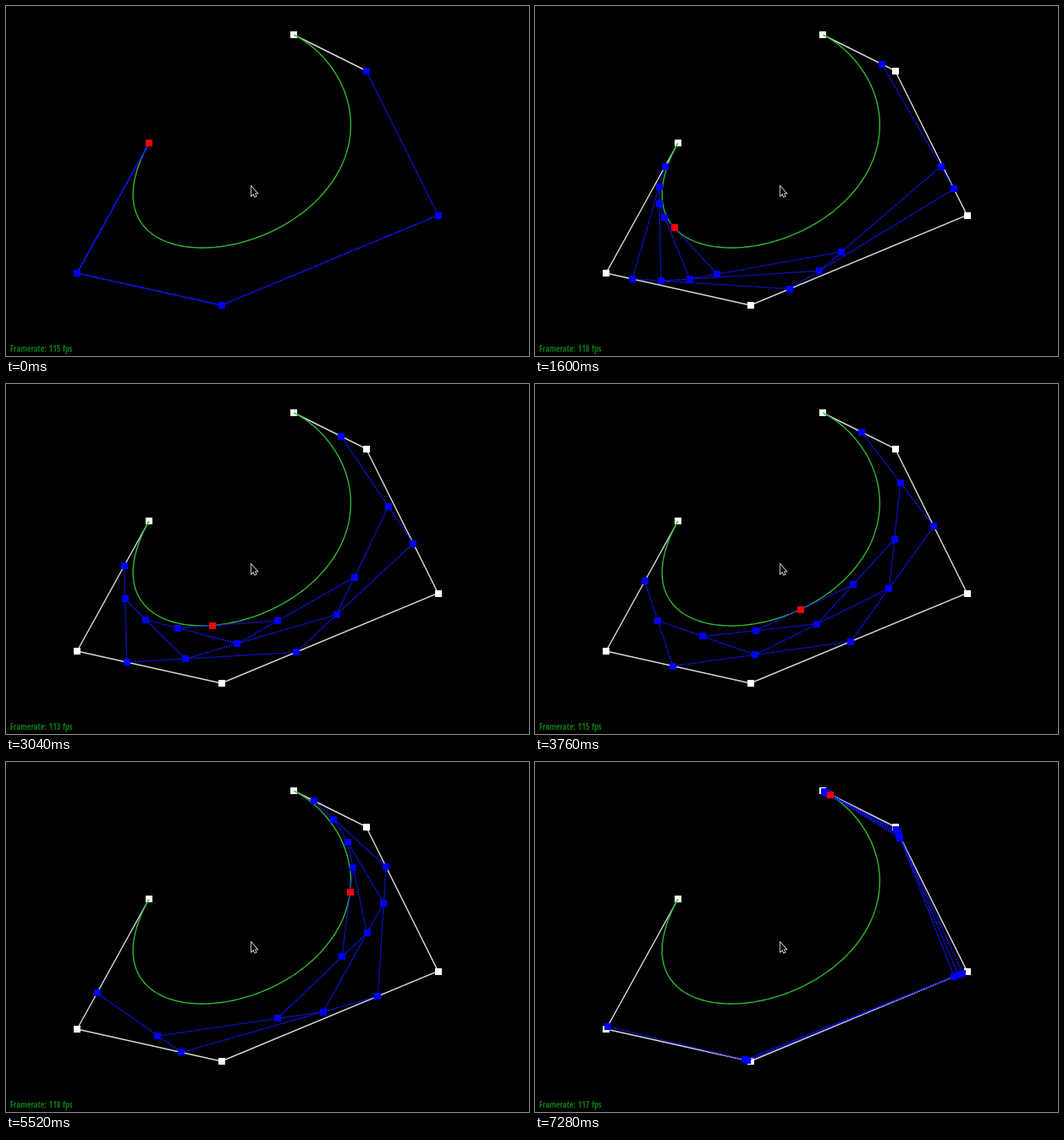
Write an HTML page with a canvas that moves like this. It is 618 px wide and 414 px high and loops after 7.36 s.

```html
<!DOCTYPE html>
<html lang="en">
<head>
<meta charset="utf-8">
<title>Bezier curve construction</title>
<style>
  html, body { margin: 0; width: 100%; height: 100%; overflow: hidden; background: #000; }
  canvas { display: block; }
</style>
</head>
<body>
<canvas id="stage" width="618" height="414"></canvas>
<script>
const ctx = document.getElementById('stage').getContext('2d');
const STEP = 80, STEPS = 92;

const controls = [[169, 162], [84, 316], [254.5, 354], [510.5, 247.5], [425.5, 76.5], [340, 34]];
// [step, curve parameter]: the pace picks up in the middle of the curve
const pace = [[0, 0], [38, 0.345], [56, 0.581], [78, 0.82], [91, 0.98]];
const cursor = new Path2D('M290 213.5v10.8l2.4-2.2 1.6 3.6 1.6-.8-1.6-3.4h3z');

const lerp = (a, b, t) => a + (b - a) * t;

function parameterAt(step) {
  const i = pace.findIndex(([end], k) => k > 0 && step <= end);
  const [s0, t0] = pace[i - 1], [s1, t1] = pace[i];
  return lerp(t0, t1, (step - s0) / (s1 - s0));
}

// The frame rate readout wanders between 113 and 118
const frameRate = second => 113 + Math.floor((2.42 + 1.52 * second) % 6);

// One round of de Casteljau's algorithm
const reduce = (points, t) => points.slice(1).map((p, i) =>
  [lerp(points[i][0], p[0], t), lerp(points[i][1], p[1], t)]);

function pointOnCurve(t) {
  let points = controls;
  while (points.length > 1) points = reduce(points, t);
  return points[0];
}

const curve = Array.from({ length: 201 }, (_, i) => pointOnCurve(i / 200));

function polyline(points, color, width, dash = []) {
  ctx.beginPath();
  points.forEach(([x, y]) => ctx.lineTo(x, y));
  ctx.strokeStyle = color;
  ctx.lineWidth = width;
  ctx.setLineDash(dash);
  ctx.stroke();
}

function handles(points, color) {
  ctx.fillStyle = color;
  points.forEach(([x, y]) => ctx.fillRect(Math.round(x - 4), Math.round(y - 4), 8, 8));
}

function drawCursor() {
  ctx.setLineDash([]);
  ctx.lineWidth = 1.5;
  ctx.strokeStyle = '#fff';
  ctx.stroke(cursor);
  ctx.fillStyle = '#000';
  ctx.fill(cursor);
}

function draw(step) {
  const t = parameterAt(step);
  ctx.fillStyle = '#000';
  ctx.fillRect(0, 0, 618, 414);

  // At the start the construction lines replace all but the last edge
  polyline(t === 0 ? controls.slice(-2) : controls, '#dcdcdc', 1.4);
  handles(controls, '#fff');
  polyline(curve, '#2fb62f', 1.4);

  const levels = [];
  for (let points = reduce(controls, t); points.length; points = reduce(points, t)) levels.push(points);
  const tip = levels.pop();
  levels.forEach(points => polyline(points, '#1414ff', 1.4, [2, 1]));
  levels.forEach(points => handles(points, '#00f'));
  handles(tip, '#f00');

  drawCursor();
  ctx.fillStyle = '#0b7a18';
  ctx.font = 'bold extra-condensed 10px "Open Sans Condensed", "Noto Sans", sans-serif';
  ctx.fillText(`Framerate: ${frameRate(Math.floor(step / 10))} fps`, 5, 409);
}

function tick() {
  draw(Math.floor(performance.now() / STEP) % STEPS);
  requestAnimationFrame(tick);
}
tick();
</script>
</body>
</html>
```
